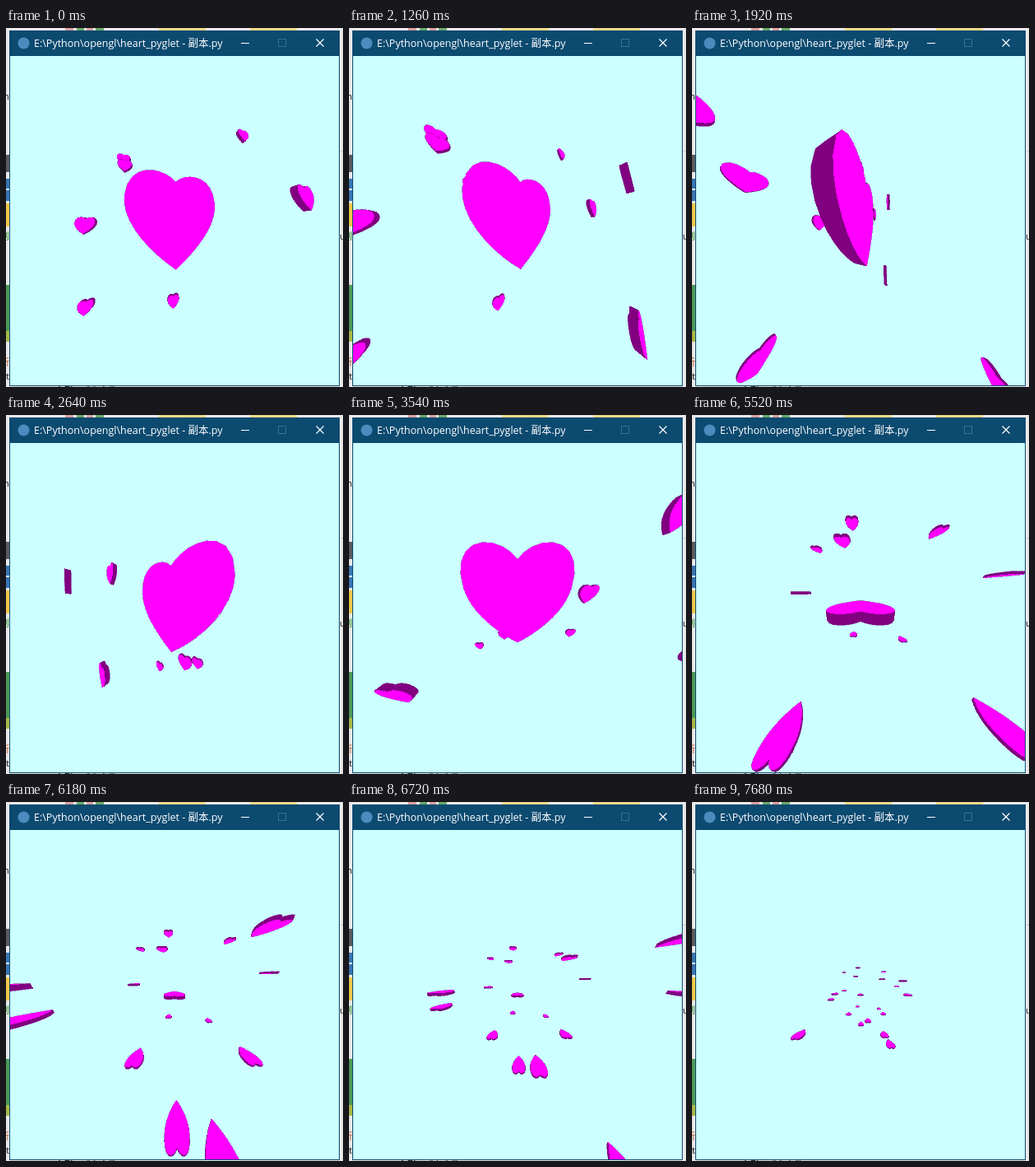
Recreate the animation shown at these times as an HTML page. Size 410 by 436 pixels, loop 8520 ms.

```html
<!DOCTYPE html>
<html lang="en">
<head>
<meta charset="utf-8">
<title>Hearts</title>
<style>
html, body { margin: 0; width: 100%; height: 100%; overflow: hidden; }
svg { display: block; width: 100%; height: 100%; }
.title { font: 12.5px "Open Sans", "Noto Sans CJK SC", "Noto Sans CJK", sans-serif; fill: #fff; }
.desk { font: 11px "Noto Sans", "Noto Sans CJK SC", "Noto Sans CJK", sans-serif; fill: #222; }
.face { fill: #f0f; }
.wall { fill: #800080; stroke: #800080; stroke-width: .5; }
</style>
</head>
<body>
<svg viewBox="0 0 410 436" shape-rendering="crispEdges">
  <defs><clipPath id="view"><rect x="5" y="34" width="400" height="400"/></clipPath></defs>
  <rect width="410" height="436" fill="#e9e9e9"/>
  <g>
    <path fill="#d9a0a0" d="M72 0h10v3h-10zM98 0h8v3h-8z"/>
    <path fill="#6aa86a" d="M86 0h9v3h-9zM109 0h10v3h-10z"/>
    <path fill="#efd98a" d="M186 0h57v3h-57zM297 0h57v3h-57z"/>
    <rect y="154" width="4" height="21" fill="#5a5a60"/>
    <rect y="183" width="4" height="27" fill="#3a76b4"/>
    <rect y="195" width="4" height="2" fill="#dce8f4"/>
    <rect y="213" width="4" height="28" fill="#f2c84b"/>
    <rect y="312" width="4" height="58" fill="#4d9a58"/>
    <rect y="368" width="4" height="13" fill="#a9b848"/>
    <rect x="406" y="149" width="4" height="1" fill="#ccc"/>
    <text class="desk" x="-3" y="87">n</text>
    <text class="desk" x="-7" y="257" style="fill:#1c8a1c">到</text>
    <text class="desk" x="-7" y="410" style="fill:#c05020">所</text>
    <text class="desk" x="0" y="427">t</text>
    <text class="desk" x="406" y="257">u</text>
    <text class="desk" x="60" y="444">心形 - 副本文件</text>
  </g>
  <rect x="4" y="3" width="402" height="432" fill="#0c4a70"/>
  <rect x="5" y="34" width="400" height="400" fill="#cff"/>
  <circle cx="21.500" cy="18.500" r="7" fill="#4b8bbe" shape-rendering="auto"/>
  <text class="title" x="34" y="23">E:\Python\opengl\heart_pyglet - 副本.py</text>
  <rect x="286" y="18" width="10" height="1" fill="#fff"/>
  <rect x="331.500" y="13.500" width="9" height="9" fill="none" stroke="#3d6e8d"/>
  <path d="M377.500 13.500l9 9m0-9l-9 9" stroke="#fff" stroke-width="1.200" shape-rendering="auto"/>
  <g id="scene" clip-path="url(#view)"></g>
</svg>
<script>
const LOOP = 8520, TICK = 60;
const CX = 205, CY = 234, FOCAL = 75, NEAR = .1;
const HEIGHT = .92, HALF_DEPTH = .07;

// Equal, parallel hearts around the one at the origin.
const PLACES = [
  [0, 0, 0], [.7, 5.7, -5.8], [1.2, 4.1, -3.6], [4.8, 7.2, -4.8], [-6, 5.1, -4.8],
  [-8.7, 3.1, -1.3], [4, 3.3, -.2], [1, 6.5, 5.7], [-5.9, 6.2, 6.3], [2.5, -.2, 4.2],
  [-4.9, -.1, 4.2], [-4.1, .4, -3], [4.3, -1.7, -.6], [5.4, -1.1, .6], [-.1, -1.9, 5.3],
  [-1.3, -2.6, 4], [-6.9, -3, -.8], [5.9, -7.1, 2.1], [-3.3, -5, 4.4], [-3.7, -6, 4.8],
  [-6.1, -2.6, -2.8]
];

// The mouse first turns the scene, then the wheel moves the camera away.
const VIEW = [
  { t: 0, yaw: 11, pitch: 8, clicks: 0 },
  { t: 1020, yaw: 11, pitch: 8, clicks: 0 },
  { t: 1920, yaw: 69, pitch: 6, clicks: 0 },
  { t: 2640, yaw: 150, pitch: -1, clicks: 0 },
  { t: 3540, yaw: 180, pitch: -22, clicks: 0 },
  { t: 3660, yaw: 180, pitch: -22, clicks: 0 },
  { t: 4560, yaw: 180, pitch: -105, clicks: 0 },
  { t: 4980, yaw: 180, pitch: -105, clicks: 0 },
  { t: 6180, yaw: 180, pitch: -105, clicks: 11 },
  { t: 6540, yaw: 180, pitch: -105, clicks: 15 },
  { t: 7680, yaw: 180, pitch: -105, clicks: 21 }
];
const distance = clicks => .72 * 1.145 ** Math.floor(clicks + 1e-6);

function cubic(a, b, c, d, t) {
  const s = 1 - t;
  return a.map((v, i) => s * s * s * v + 3 * s * s * t * b[i] + 3 * s * t * t * c[i] + t * t * t * d[i]);
}

// Heart rim from the cleft, clockwise.
function heartRim(n) {
  const lobe = [[0, 0], [.12, -.16], [.5, -.2], [.5, .24]];
  const flank = [[.5, .24], [.5, .5], [.28, .78], [0, 1]];
  const right = [];
  for (const curve of [lobe, flank])
    for (let i = 0; i < n; i++) right.push(cubic(...curve, i / n));
  right.push([0, 1]);
  const left = right.slice(1, -1).reverse().map(([x, y]) => [-x, y]);
  return [...right, ...left].map(([x, y]) => [x, (y - .48) * HEIGHT]);
}
const RIM = heartRim(9);

function viewAt(t) {
  const i = VIEW.findIndex(v => v.t > t);
  if (i < 0) return VIEW[VIEW.length - 1];
  const a = VIEW[i - 1], b = VIEW[i], f = (t - a.t) / (b.t - a.t);
  const mix = key => a[key] + (b[key] - a[key]) * f;
  return { yaw: mix("yaw"), pitch: mix("pitch"), clicks: mix("clicks") };
}

function camera({ yaw, pitch, clicks }) {
  const rad = Math.PI / 180, d = distance(clicks);
  const cy = Math.cos(yaw * rad), sy = Math.sin(yaw * rad);
  const cp = Math.cos(pitch * rad), sp = Math.sin(pitch * rad);
  return (x, y, z) => {
    const turned = z * cy + x * sy;
    return [x * cy - z * sy, y * cp + turned * sp, turned * cp - y * sp + d];
  };
}

const project = ([x, y, z]) => [CX + FOCAL * x / z, CY + FOCAL * y / z];

const area = pts => pts.reduce((sum, [x, y], i) => {
  const [nx, ny] = pts[(i + 1) % pts.length];
  return sum + x * ny - nx * y;
}, 0);

const polygon = pts => "M" + pts.map(p => p.map(v => v.toFixed(2)).join(" ")).join("L") + "Z";

function heartPaths([px, py, pz], see) {
  const side = h => RIM.map(([x, y]) => see(px + x, py + y, pz + h));
  const solid = [side(-HALF_DEPTH), side(HALF_DEPTH)];
  if (solid.flat().some(p => p[2] < NEAR)) return { wall: "", face: "" };
  const [front, back] = solid.map(s => s.map(project));
  let wall = "";
  front.forEach((p, i) => {
    const j = (i + 1) % front.length;
    const quad = [p, front[j], back[j], back[i]];
    wall += polygon(area(quad) < 0 ? quad.reverse() : quad);
  });
  const face = area(front) > 0 ? polygon(front) : area(back) < 0 ? polygon(back) : "";
  return { wall, face };
}

const scene = document.getElementById("scene");
function addPath(name) {
  const el = document.createElementNS("http://www.w3.org/2000/svg", "path");
  el.setAttribute("class", name);
  return scene.appendChild(el);
}
const layers = PLACES.map(() => ({ wall: addPath("wall"), face: addPath("face") }));

function draw(t) {
  const see = camera(viewAt(t));
  const farFirst = [...PLACES].sort((a, b) => see(...b)[2] - see(...a)[2]);
  farFirst.forEach((place, i) => {
    const { wall, face } = heartPaths(place, see);
    layers[i].wall.setAttribute("d", wall);
    layers[i].face.setAttribute("d", face);
  });
}

const start = performance.now();
let shown = -1;
function tick() {
  const t = Math.floor((performance.now() - start) % LOOP / TICK) * TICK;
  if (t !== shown) draw(shown = t);
  requestAnimationFrame(tick);
}
tick();
</script>
</body>
</html>
```
